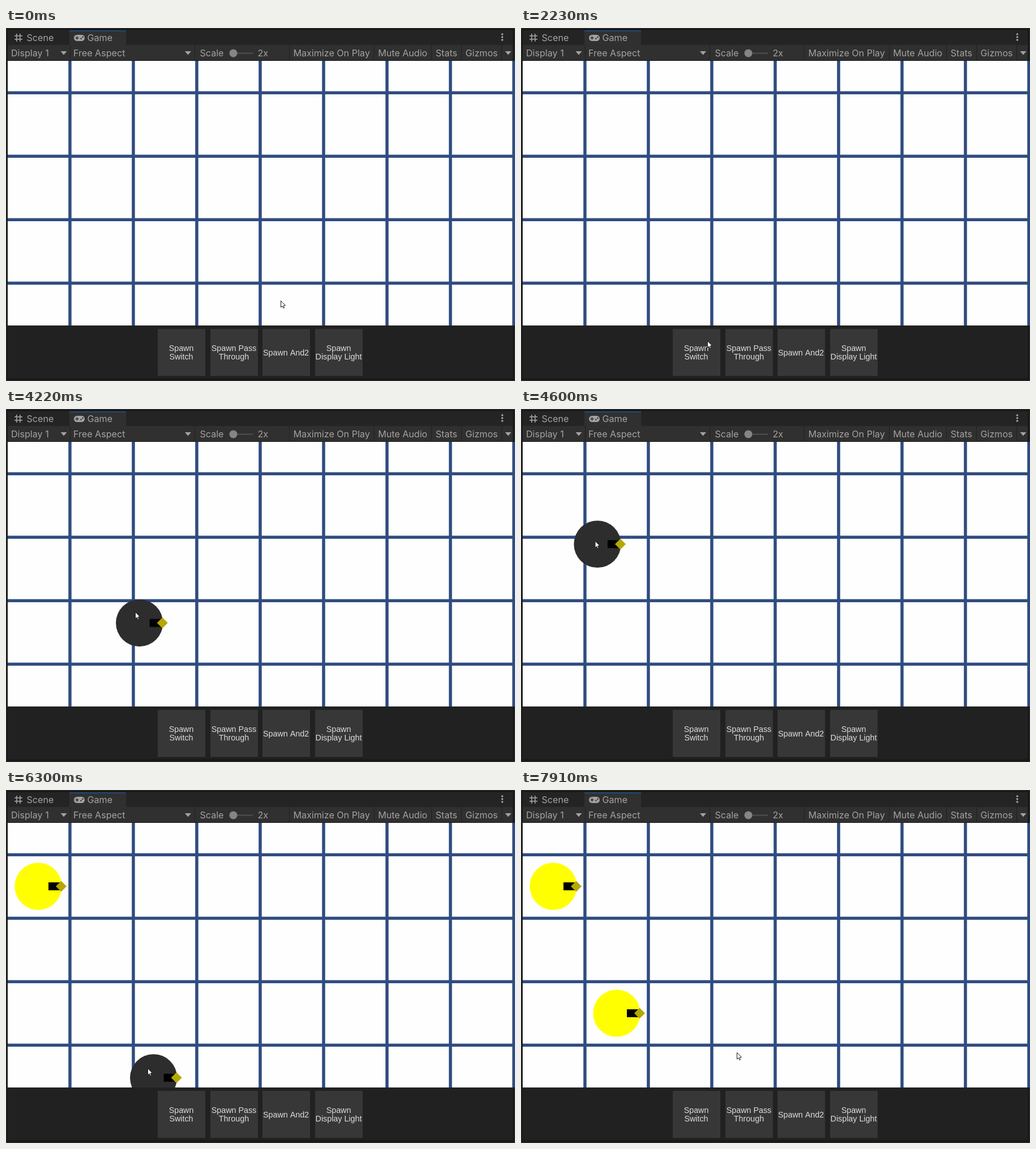
These frames come from a looping animation (899 px wide and 623 px high, 8 s). An HTML page with a canvas:

```html
<!DOCTYPE html>
<html lang="en">
<head>
<meta charset="utf-8">
<title>Logic gate sandbox</title>
<style>
html, body { margin: 0; width: 100%; height: 100%; overflow: hidden; background: #191919; }
canvas { display: block; width: 899px; height: 623px; }
</style>
</head>
<body>
<canvas id="stage" width="899" height="623"></canvas>
<script>
const ctx = document.getElementById('stage').getContext('2d');
const LOOP = 8000;

// The screen refreshes at a fixed rate; all motion is counted in refreshes.
const FIRST = 1246;
const STEP = 123;
const LAG = 0.2; // a dragged part trails the pointer by this much

const GREY = '#a3a3a3';
const BAR = '#303030';
const BLUE = '#304c80';

const linear = u => u;
const smooth = u => u * u * (3 - 2 * u);
const easeIn = u => u ** 1.5;
const easeOut = u => 1 - (1 - u) ** 2;

// Pointer moves; it rests wherever there is a gap between two of them.
const START = { x: 485, y: 481 };
const moves = [
  { from: -1, to: 8, x: 329, y: 552, ease: smooth },
  { from: 8, to: 12, x: 219, y: 280, ease: smooth },
  { from: 12, to: 19, x: 306, y: 557, ease: easeOut },
  { from: 21, to: 24, x: 228, y: 358, ease: easeIn },
  { from: 24, to: 30, x: 98, y: 191, ease: easeOut },
  { from: 33, to: 39, x: 303, y: 575, ease: smooth },
  { from: 40, to: 41, x: 250, y: 491, ease: linear },
  { from: 41, to: 44, x: 172, y: 403, ease: linear },
  { from: 47, to: 52, x: 391, y: 547, ease: smooth },
  { from: 52, to: 54, x: 381, y: 463, ease: linear }
];

function pointerAt(step) {
  let { x, y } = START;
  for (const m of moves) {
    if (step <= m.from) break;
    const u = m.ease(Math.min(1, (step - m.from) / (m.to - m.from)));
    x += (m.x - x) * u;
    y += (m.y - y) * u;
  }
  return { x, y };
}

const cellCenter = (col, row) => ({ x: 57 + col * 112, y: 170 + row * 112 });

// A dropped switch lights up, then snaps to its cell one refresh later.
const switches = [
  { spawn: 20, drop: 31, home: cellCenter(0, 0) },
  { spawn: 40, drop: 45, home: cellCenter(1, 2) }
];

function rect(x, y, w, h, color) {
  ctx.fillStyle = color;
  ctx.fillRect(x, y, w, h);
}

function poly(points, color) {
  ctx.beginPath();
  points.forEach(([x, y]) => ctx.lineTo(x, y));
  ctx.closePath();
  ctx.fillStyle = color;
  ctx.fill();
}

function disc(x, y, r, color) {
  ctx.beginPath();
  ctx.arc(x, y, r, 0, Math.PI * 2);
  ctx.fillStyle = color;
  ctx.fill();
}

function text(str, x, y, color = GREY) {
  ctx.fillStyle = color;
  ctx.fillText(str, x, y);
}

const divider = x => rect(x, 30, 1, 27, '#212121');
const arrowDown = x => poly([[x - 5.5, 41], [x + 5.5, 41], [x, 47.5]], GREY);

function drawTabs() {
  rect(3, 4, 892, 26, '#242424');
  rect(112, 4, 100, 26, BAR);
  rect(112, 4, 100, 2, '#234a78');

  for (const d of [0, 6]) {
    rect(18 + d, 10, 1.6, 14, GREY);
    rect(15, 13 + d, 14, 1.6, GREY);
  }
  text('Scene', 36.5, 23);

  ctx.beginPath();
  ctx.roundRect(120, 12, 19, 11, 5.5);
  ctx.fillStyle = GREY;
  ctx.fill();
  rect(122.5, 16.7, 6, 1.6, BAR);
  rect(124.7, 14.5, 1.6, 6, BAR);
  disc(132.5, 18.8, 1.3, BAR);
  disc(135.5, 16, 1.3, BAR);
  text('Game', 143.5, 23);

  for (let i = 0; i < 3; i++) disc(876.5, 11 + i * 5, 1.8, GREY);
}

function drawToolbar() {
  rect(3, 30, 892, 27, BAR);
  const label = (str, x) => text(str, x, 49.5);

  label('Display 1', 9);
  label('Free Aspect', 119);
  label('Scale', 342.5);
  rect(404, 43.5, 32, 2, '#505050');
  disc(401.5, 44.5, 7, '#858585');
  label('2x', 444.5);

  // Buttons sit side by side, each as wide as its label plus padding.
  let x = 501;
  for (const str of ['Maximize On Play', 'Mute Audio', 'Stats', 'Gizmos']) {
    divider(Math.round(x) - 1);
    label(str, x + 6.5);
    x += ctx.measureText(str).width + 14.5;
  }
  [113, 333, 875].forEach(divider);
  [102, 321.5, 887].forEach(arrowDown);
}

function drawHeader() {
  rect(0, 0, 899, 623, '#191919');
  ctx.strokeStyle = '#303030';
  ctx.lineWidth = 1;
  ctx.strokeRect(0.5, 0.5, 898, 622);
  ctx.font = '16.1px Inter, sans-serif';
  ctx.textAlign = 'left';
  drawTabs();
  drawToolbar();
}

function drawGrid() {
  rect(3, 58, 892, 467, '#fefefe');
  for (let x = 110.2; x < 895; x += 112) rect(x, 58, 5.5, 467, BLUE);
  for (let y = 111.6; y < 525; y += 112) rect(3, y, 892, 5.4, BLUE);
}

function drawSwitch({ spawn, drop, home }, step) {
  if (step < spawn) return;
  const { x, y } = step > drop ? home : pointerAt(step - LAG);
  disc(x, y, 41.6, step >= drop ? '#ffff00' : '#2d2d2d');
  rect(x + 18, y - 7, 20, 14, '#000');
  poly([[x + 31, y], [x + 40.5, y - 9.5], [x + 50, y], [x + 40.5, y + 9.5]], '#b5a800');
}

function drawPanel(pointer) {
  rect(3, 525, 892, 93, '#212121');
  ctx.font = '14.3px "Liberation Sans", Arial, sans-serif';
  ctx.textAlign = 'center';
  ['Spawn|Switch', 'Spawn Pass|Through', 'Spawn And2', 'Spawn|Display Light'].forEach((label, i) => {
    const x = Math.round(268 + i * 92.5);
    const lines = label.split('|');
    rect(x, 531, 84, 83, '#373737');
    lines.forEach((line, k) =>
      text(line, x + 41.5, 577.5 + (k - (lines.length - 1) / 2) * 14.5, '#dedede'));
  });
}

function drawPointer({ x, y }) {
  ctx.save();
  ctx.translate(x + 0.5, y + 0.5);
  poly([[0, 0], [0, 11.5], [2.6, 9.2], [4.4, 13], [6.2, 12.2], [4.5, 8.5], [8, 8.2]], '#fff');
  ctx.strokeStyle = '#1c1c1c';
  ctx.lineWidth = 1;
  ctx.stroke();
  ctx.restore();
}

function draw(now) {
  const step = Math.floor((now % LOOP - FIRST) / STEP);
  drawHeader();
  drawGrid();
  switches.forEach(s => drawSwitch(s, step));
  drawPanel();
  drawPointer(pointerAt(step));
}

const start = performance.now();
function loop() {
  draw(performance.now() - start);
  requestAnimationFrame(loop);
}
loop();
</script>
</body>
</html>
```
